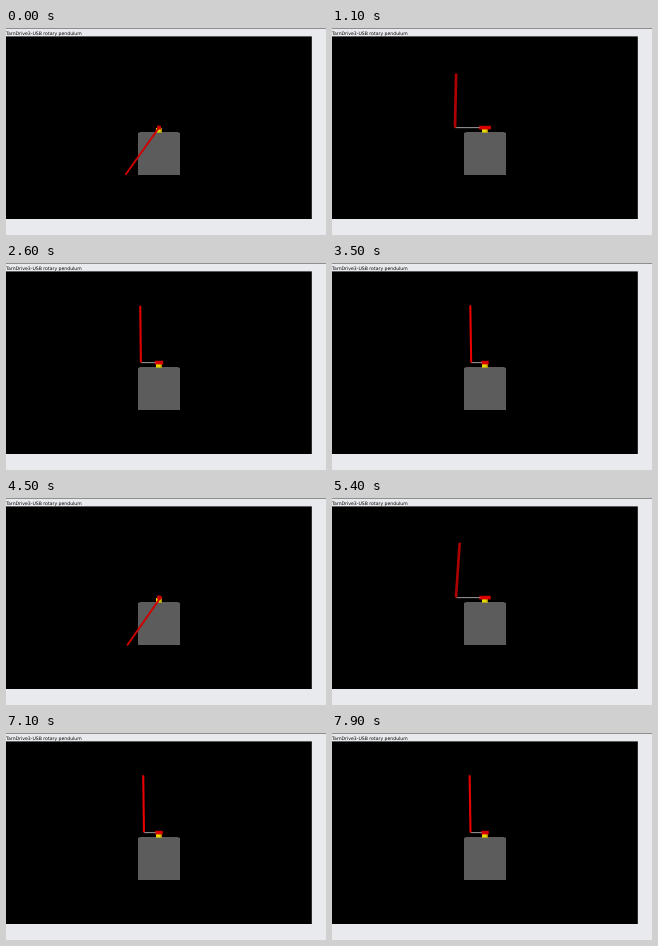
An HTML page with a canvas that plays this animation: 320 px wide and 207 px high, repeating every 8 s.

```html
<!DOCTYPE html>
<html lang="en">
<head>
<meta charset="utf-8">
<title>Rotary pendulum</title>
<style>
  html, body { margin: 0; width: 100%; height: 100%; overflow: hidden; background: #e9eaed; }
  canvas { position: absolute; left: 0; top: 0; width: 320px; height: 207px; }
  #title {
    position: absolute; left: 0; top: 2px; color: #000; white-space: nowrap;
    font: 4.6px/7px "DejaVu Sans", "Open Sans", sans-serif;
  }
</style>
</head>
<body>
<canvas id="view"></canvas>
<div id="title">TarnDrive3-USB rotary pendulum</div>
<script>
const LOOP = 8000, STEP = 100;
const CX = 153, CY = 99.6;       // vanishing point and hub
const EYE = 300, ARM = 30, POLE = 52.3;

// Each run swings the pole, throws it upright, then brings the arm back.
// Times are in seconds, angles in degrees; arm 0 faces the viewer, pole 0 hangs.
const RESET = 4.25;
const firstRun = { peak: .06, swing: 42, launch: .3, settle: 2.06, rest: 0, goal: 24 };
const secondRun = { peak: 4.4, swing: 60, launch: 4.72, settle: 5.8, rest: -2.5, goal: 26 };

const canvas = document.getElementById("view");
const ctx = canvas.getContext("2d");
const ratio = window.devicePixelRatio || 1;
canvas.width = 320 * ratio;
canvas.height = 207 * ratio;
ctx.scale(ratio, ratio);

const rad = deg => deg * Math.PI / 180;
const mix = (a, b, u) => a + (b - a) * u;
const smooth = u => {
  u = Math.max(0, Math.min(1, u));
  return u * u * (3 - 2 * u);
};

function armAngle(run, t) {
  const back = 1 / (1 + Math.exp(-3 * (t - run.settle)));
  return mix(run.rest, mix(82, run.goal, back), smooth((t - run.launch + .1) / .5));
}

function poleAngle(run, t) {
  const swing = -run.swing * Math.cos(9.5 * (Math.min(t, run.launch) - run.peak));
  const climb = 1 - Math.exp(-Math.max(0, t - run.launch) / .33);
  return mix(swing, 181, climb);
}

function project(x, y, z) {
  const s = EYE / (EYE - z);
  return [CX + x * s, CY + y * s];
}

function rect(color, x, y, w, h) {
  ctx.fillStyle = color;
  ctx.fillRect(x, y, w, h);
}

function line(color, width, from, to, cap = "butt") {
  ctx.strokeStyle = color;
  ctx.lineWidth = width;
  ctx.lineCap = cap;
  ctx.beginPath();
  ctx.moveTo(...from);
  ctx.lineTo(...to);
  ctx.stroke();
}

function drawBase() {
  rect("#e9eaed", 0, 0, 320, 207);
  rect("#777", 0, 0, 320, .8);
  rect("#000", 0, 8.4, 305.8, 182.6);
  rect("#5c5c5c", 132, 105, 42, 42);
  ctx.beginPath();
  ctx.moveTo(132, 105);
  ctx.lineTo(134.5, 104);
  ctx.lineTo(171.5, 104);
  ctx.lineTo(174, 105);
  ctx.fill();
  rect("#e6d800", 150, 100, 6, 4.6);
  rect("#a88f00", 154.6, 100, 1.4, 4.6);
}

function drawPendulum(arm, pole) {
  const side = Math.sin(arm), front = Math.cos(arm);
  const joint = [-ARM * side, 0, ARM * front];
  const swing = POLE * Math.sin(pole), drop = POLE * Math.cos(pole);
  const tip = [joint[0] + swing * front, drop, joint[2] + swing * side];
  const end = project(...joint);

  // hub cap turns with the arm
  const half = 4 * side;
  line("#d80000", 3.6, [CX - half - 2, CY], [CX + half + 2, CY]);
  line("#909090", 1.1, [CX - half - 1.5, CY], end);

  const red = drop > 0 ? 205 : Math.max(175, Math.min(235, 305 - 155 * side));
  const width = 1.9 + .8 * side * side;
  line(`rgb(${Math.round(red)},0,0)`, width, end, project(...tip));
  if (side < .3) line("#c80000", 3.4, [CX, CY - .4], end, "round");
}

function draw(now) {
  const t = Math.floor((now % LOOP) / STEP) * STEP / 1000;
  const run = t < RESET ? firstRun : secondRun;
  drawBase();
  drawPendulum(rad(armAngle(run, t)), rad(poleAngle(run, t)));
}

const start = performance.now();
function tick() {
  draw(performance.now() - start);
  requestAnimationFrame(tick);
}
tick();
</script>
</body>
</html>
```
